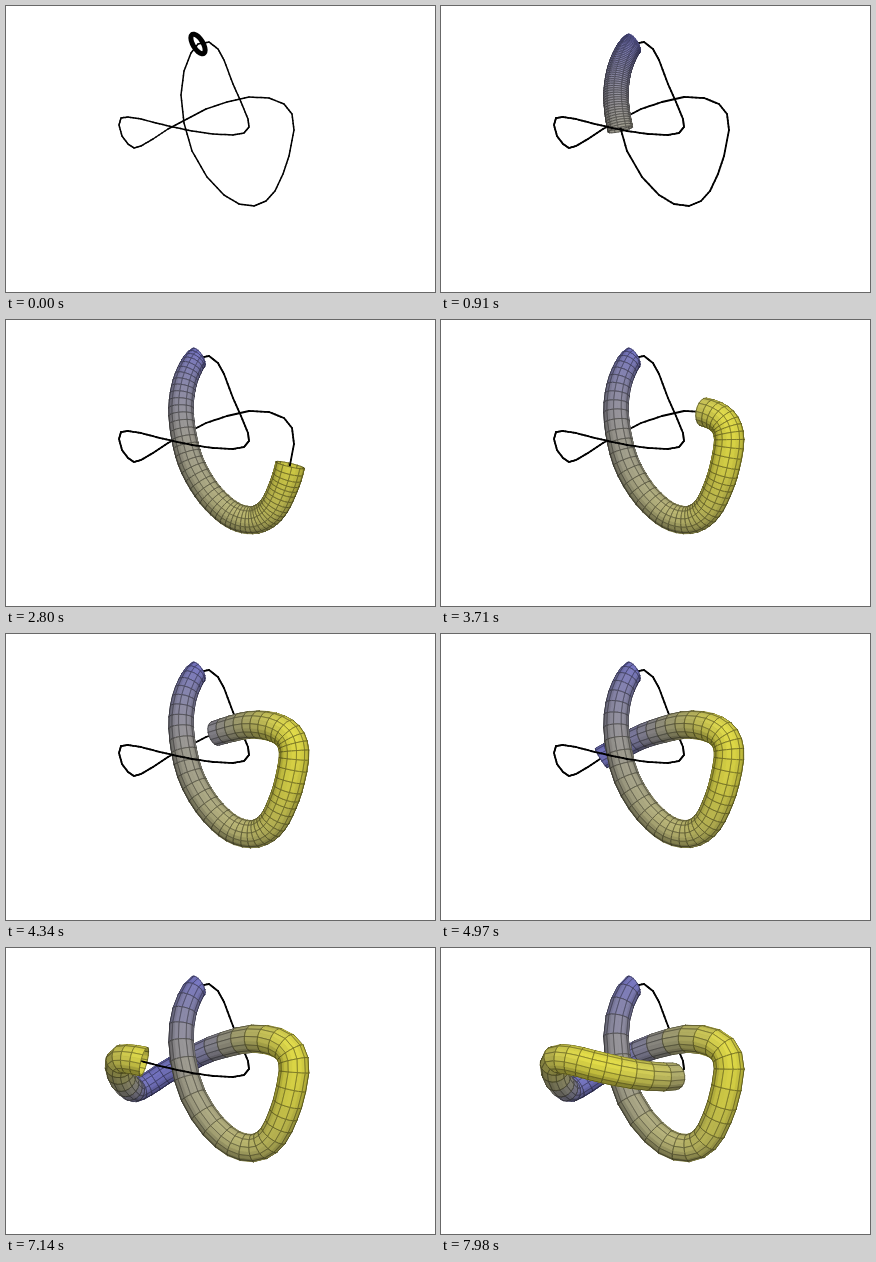
Animation of 429x286 px, one loop 8000 ms. Source, as an HTML page with a canvas:

```html
<!DOCTYPE html>
<html lang="en">
<head>
<meta charset="utf-8">
<title>Tube growing along a knot</title>
<style>
html, body { margin: 0; width: 100%; height: 100%; overflow: hidden; background: #fff; }
canvas { display: block; width: 429px; height: 286px; }
</style>
</head>
<body>
<canvas id="stage" width="429" height="286"></canvas>
<script>
const ctx = document.getElementById('stage').getContext('2d');
const LOOP = 8000, DEPTH = 80, RINGS = 49, SIDES = 20;

// Knot vertices: x, y and height in percent
const knot = [
  [192,38,8], [185,47,17], [178,65,26], [175,89,35], [178,117,44], [186,145,50],
  [201,171,56], [218,189,62], [233,198,67], [248,200,72], [260,195,78], [269,185,84],
  [277,168,91], [283,150,97], [288,124,100], [286,108,99], [278,98,95], [263,92,84],
  [243,91,65], [221,96,44], [200,103,26], [181,113,15], [162,123,10], [147,133,9],
  [135,140,13], [128,142,22], [122,138,38], [116,130,55], [113,119,72], [115,112,84],
  [122,111,91], [135,113,97], [150,117,100], [167,121,99], [186,125,94], [207,128,85],
  [227,129,70], [238,127,54], [243,121,40], [242,113,28], [235,96,16], [227,78,9],
  [218,54,4], [212,43,2], [203,36,4]
].map(([x, y, h]) => [x, y, h / 100 * DEPTH]);
const N = knot.length;

// Tube end along the vertices for a given step
const growth = [[0, 0], [8, 8.45], [17, 17], [23, 22.1], [28, 26.7], [33, 31.2], [37, 36.5]];

const add = (a, b, k = 1) => a.map((v, i) => v + b[i] * k);
const dot = (a, b) => a[0] * b[0] + a[1] * b[1] + a[2] * b[2];
const unit = a => a.map(v => v / Math.hypot(...a));
const cross = (a, b) => [
  a[1] * b[2] - a[2] * b[1], a[2] * b[0] - a[0] * b[2], a[0] * b[1] - a[1] * b[0]
];
const light = unit([0.15, -0.45, 0.9]);

function around(s) {
  const i = Math.floor(s);
  return [-1, 0, 1, 2].map(d => knot[(i + d + N) % N]);
}
function curve(s) {
  const [a, b, c, d] = around(s), f = s - Math.floor(s);
  return b.map((v, i) => v + 0.5 * f * (c[i] - a[i] +
    f * (2 * a[i] - 5 * v + 4 * c[i] - d[i] + f * (3 * (v - c[i]) + d[i] - a[i]))));
}
function chord(s) {
  const [, b, c] = around(s);
  return add(b, add(c, b, -1), s - Math.floor(s));
}
const tangent = s => unit(add(curve(s + 0.08), curve(s + N - 0.08 - (s >= 0.08 ? N : 0)), -1));

function ring(s, u) {
  const p = curve(s), t = tangent(s);
  u = unit(add(u, t, -dot(u, t)));
  const v = cross(t, u), h = p[2] / DEPTH, r = 10.8 + 4 * h;
  const pts = [], normals = [];
  for (let i = 0; i <= SIDES; i++) {
    const a = i / SIDES * 2 * Math.PI;
    const n = add(u.map(x => x * Math.cos(a)), v, Math.sin(a));
    normals.push(n);
    pts.push(add(p, n, r));
  }
  return { u, h, pts, normals };
}

function shade(h, n) {
  const k = 0.56 + 0.44 * Math.abs(dot(n, light));
  return [[106, 228], [106, 222], [208, 72]].map(([lo, hi]) => (lo + (hi - lo) * h) * k);
}
const rgb = c => `rgb(${c.map(Math.round)})`;

function trace(pts, color, width) {
  ctx.beginPath();
  pts.forEach(p => ctx.lineTo(p[0], p[1]));
  ctx.strokeStyle = color;
  ctx.lineWidth = width;
  ctx.stroke();
}

function tube(end, parts) {
  let prev = ring(0, [0, 0, 1]);
  for (let j = 1; j <= RINGS; j++) {
    const next = ring(end * j / RINGS, prev.u), a = prev;
    for (let i = 0; i < SIDES; i++) {
      const quad = [a.pts[i], a.pts[i + 1], next.pts[i + 1], next.pts[i]];
      const color = shade((a.h + next.h) / 2, unit(add(a.normals[i], next.normals[i + 1])));
      const z = quad.reduce((sum, p) => sum + p[2], 0) / 4;
      const edge = i % 2 ? [quad[1], quad[2]] : [quad[0], quad[3]];
      parts.push({ z, draw() {
        trace([...quad, quad[0]], rgb(color), 0.7);
        ctx.fillStyle = rgb(color);
        ctx.fill();
        const mesh = rgb(color.map(c => c * 0.5));
        trace([quad[0], quad[1]], mesh, 0.8);
        trace([quad[2], quad[3]], mesh, 0.8);
        trace(edge, mesh, 0.7);
      } });
    }
    prev = next;
  }
}

function wire(from, width, parts) {
  const cuts = 5;
  for (let i = Math.ceil(from * cuts); i < N * cuts; i++) {
    const a = chord(i / cuts), b = chord((i + 1) / cuts);
    parts.push({ z: (a[2] + b[2]) / 2, draw: () => trace([a, b], '#000', width) });
  }
}

function endAt(step) {
  const i = Math.max(1, growth.findIndex(g => g[0] >= step));
  const [k0, s0] = growth[i - 1], [k1, s1] = growth[i];
  return s0 + (s1 - s0) * (step - k0) / (k1 - k0);
}

// Steps of 210 ms; every sixteenth is held for 280 ms
function stepAt(t) {
  const r = t % 3430;
  return 16 * Math.floor(t / 3430) + (r < 280 ? 0 : Math.floor((r - 280) / 210) + 1);
}

function paint(step) {
  ctx.fillStyle = '#fff';
  ctx.fillRect(0, 0, 429, 286);
  ctx.lineCap = ctx.lineJoin = 'round';
  const parts = [];
  if (step) {
    const end = endAt(step);
    tube(end, parts);
    wire(Math.max(0, end - 0.5), 1.8, parts);
  } else {
    wire(0, 1.5, parts);
  }
  parts.sort((a, b) => a.z - b.z).forEach(p => p.draw());
  if (!step) trace(ring(0, [0, 0, 1]).pts, '#000', 5);
}

let shown = -1;
function tick() {
  const step = stepAt(performance.now() % LOOP);
  if (step !== shown) paint(shown = step);
  requestAnimationFrame(tick);
}
tick();
</script>
</body>
</html>
```
